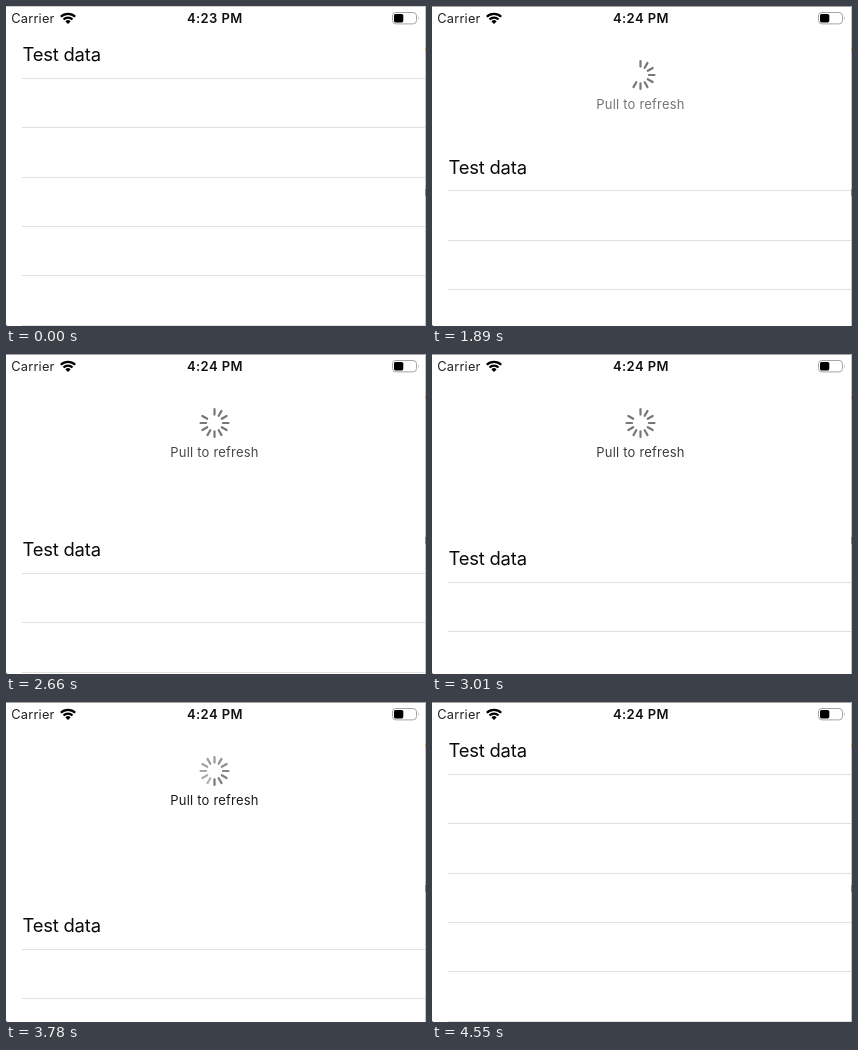
Animation of 420 by 320 pixels, one loop 5.46 s. Source, as an HTML page:

```html
<!DOCTYPE html>
<html lang="en">
<head>
<meta charset="utf-8">
<title>Pull to refresh</title>
<style>
  html, body { margin: 0; width: 100%; height: 100%; overflow: hidden; background: #fff; }
  svg { display: block; width: 420px; height: 320px; }
  text { font-family: Inter, Roboto, sans-serif; font-size: 13px; white-space: pre; }
  #carrier { font-size: 12.8px; letter-spacing: .2px; fill: #222; }
  #clock { font-weight: 600; letter-spacing: .4px; fill: #111; }
  #row { font-size: 18.4px; letter-spacing: -.2px; fill: #0a0a0a; }
  #label { text-anchor: middle; letter-spacing: .2px; }
  #lines rect { fill: #e0e0e0; }
  #ticks line { stroke: #777; stroke-width: 2.2; stroke-linecap: round; }
</style>
</head>
<body>
<svg viewBox="0 0 420 320">
  <rect width="420" height="320" fill="#fff"/>

  <text id="row" x="16.5" y="55">Test data</text>
  <g id="lines"></g>

  <g id="refresh">
    <g id="ticks"></g>
    <text id="label" x="208.5" y="102.6">Pull to refresh</text>
  </g>

  <text id="carrier" x="5.3" y="17.3">Carrier</text>
  <g fill="none" stroke="#000" stroke-width="2.3">
    <path d="M54.8 10.8A10.3 10.3 0 0 1 69.2 10.8M57.5 13.5A6.4 6.4 0 0 1 66.5 13.5"/>
    <path d="M62 18L59.4 15.4A3.7 3.7 0 0 1 64.6 15.4Z" fill="#000" stroke="none"/>
  </g>
  <text id="clock" x="181" y="17.3">4:23 PM</text>
  <rect x="386.5" y="6.5" width="24" height="11.4" rx="3.4" fill="none" stroke="#a6a6a6"/>
  <rect x="388" y="8" width="9.3" height="8.4" rx="1.6"/>
  <path d="M412 10.3Q413.6 12.2 412 14.1Z" fill="#a6a6a6"/>

  <!-- window edge -->
  <rect id="edge" width="420" height="1" fill="#a4a4a4"/>
  <rect x="419" width="1" height="320" fill="#c4c4c4"/>
  <rect x="419" y="42" width="1" height="3" fill="#c9a56c"/>
  <rect x="419" y="183" width="1" height="7" fill="#888"/>
  <rect y="319" width="1" height="1" fill="#777"/>
</svg>
<script>
const LOOP = 5460, STEP = 70;
const DRAG = 1470, TRIGGER = 3360, RELEASE = 3780, END = 4550;
const $ = id => document.getElementById(id);
const clamp = v => Math.max(0, Math.min(1, v));
const span = (t, from, to) => clamp((t - from) / (to - from));
const smooth = u => u * u * (3 - 2 * u);

function add(parent, tag, attrs) {
  const el = document.createElementNS('http://www.w3.org/2000/svg', tag);
  for (const k in attrs) el.setAttribute(k, attrs[k]);
  return parent.appendChild(el);
}

const lines = Array.from({ length: 6 }, () =>
  add($('lines'), 'rect', { x: 16, width: 403, height: 1 }));

const ticks = Array.from({ length: 12 }, (_, i) =>
  add($('ticks'), 'line', { y1: -8.4, y2: -14, transform: `rotate(${i * 30})` }));

// Quick pull, slow drift while held, then an eased return.
function pullAt(t) {
  const drift = 131.3 + .0249 * (Math.min(t, RELEASE) - 2030);
  return drift * smooth(span(t, DRAG, DRAG + 535)) * (1 - span(t, RELEASE, END)) ** 3.2;
}

function draw(t) {
  const pull = pullAt(t);
  const busy = t > TRIGGER;
  const fade = 1 - span(t, 4130, 4480);

  $('row').setAttribute('transform', `translate(0 ${Math.round(pull)})`);
  lines.forEach((line, i) => line.setAttribute('y', Math.floor(72.3 + 49.4 * i + pull)));
  $('clock').textContent = t < 1540 ? '4:23 PM' : '4:24 PM';
  $('edge').setAttribute('opacity', t < 1330 ? .5 : 1);

  $('refresh').setAttribute('opacity', fade);
  $('label').setAttribute('opacity', busy ? .9 : clamp((pull - 10) / 190));

  const turn = Math.max(0, (t - 4060) / STEP * 15);
  const size = fade * (1 + .55 * Math.sin(Math.PI * span(t, TRIGGER, TRIGGER + 350)));
  $('ticks').setAttribute('transform', `translate(208.5 69) rotate(${turn}) scale(${size})`);

  // The last tick appears only once refreshing starts.
  const shown = Math.min(11, Math.floor(12 * pull / 160));
  const head = Math.floor((t - TRIGGER) / STEP);
  ticks.forEach((tick, i) => {
    const trail = ((head - i) % 12 + 12) % 12;
    tick.setAttribute('opacity', busy ? 1 - trail * .04 : +(i < shown));
  });
}

function frame() {
  draw(Math.floor(performance.now() % LOOP / STEP) * STEP);
  requestAnimationFrame(frame);
}
frame();
</script>
</body>
</html>
```
